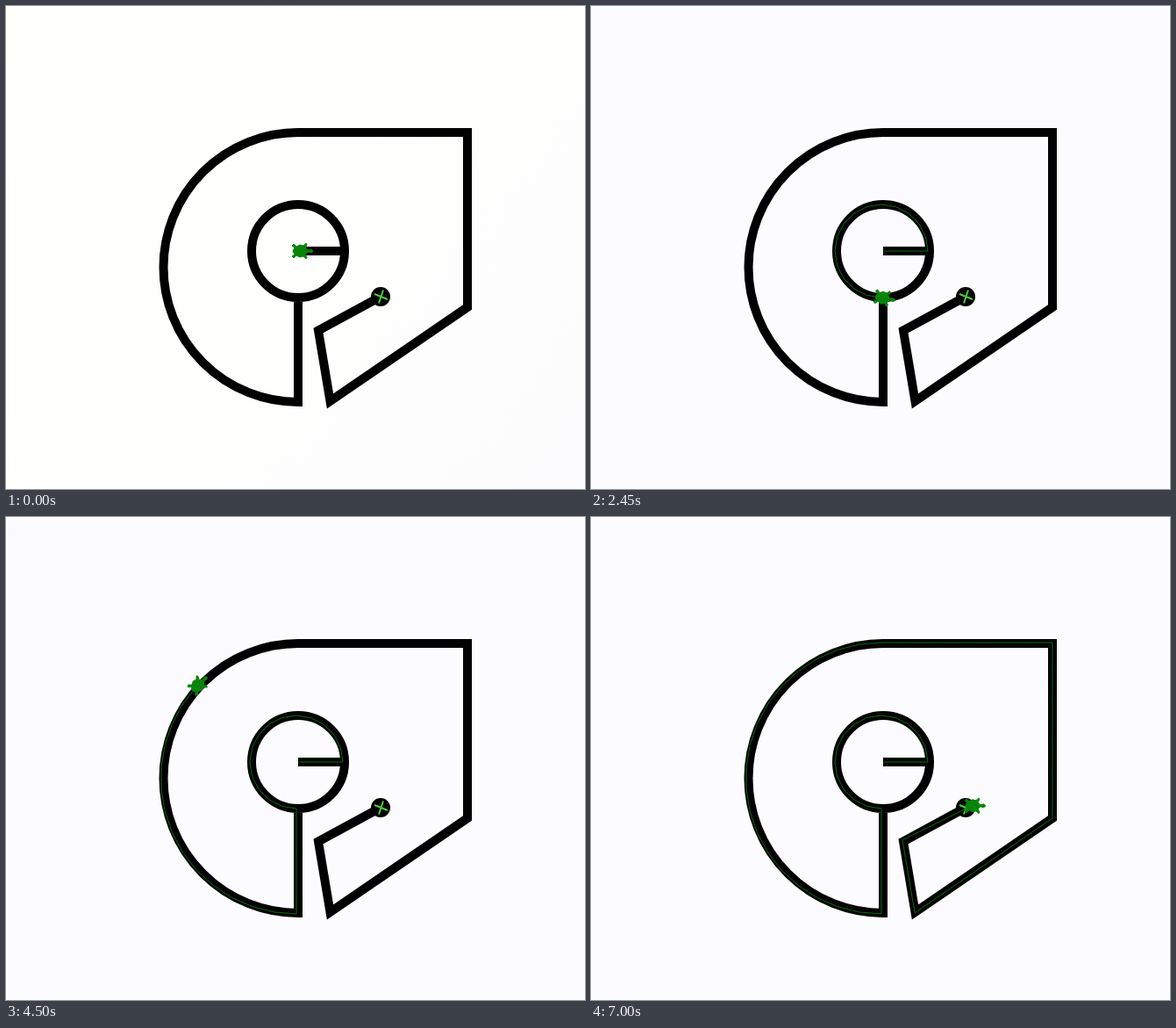
An HTML page with a canvas that plays this animation: 660 px wide and 550 px high, repeating every 8 s.

```html
<!DOCTYPE html>
<html lang="en">
<head>
<meta charset="utf-8">
<title>Turtle path</title>
<style>
html, body { margin: 0; width: 100%; height: 100%; overflow: hidden; background: #fcfcfe; }
canvas { display: block; }
</style>
</head>
<body>
<canvas id="stage" width="660" height="550"></canvas>
<script>
const ctx = document.getElementById('stage').getContext('2d');
const LOOP = 8000, START = 908, TICK = 125 / 3, LAST = 146;
const rad = a => a * Math.PI / 180;

// Every screen update of the turtle is one state.
const STRIDE = 9 * 1.1 ** 3;
const states = [{ x: 334, y: 279, a: 0 }];
const push = change => states.push({ ...states[states.length - 1], ...change });

function forward(d) {
  const { x, y, a } = states[states.length - 1];
  const hops = 1 + Math.floor(d / STRIDE);
  for (let i = 1; i <= hops; i++) {
    const s = d * i / hops;
    push({ x: x + s * Math.cos(rad(a)), y: y - s * Math.sin(rad(a)) });
  }
}

function turn(angle, steps = 1 + Math.floor(Math.abs(angle) / STRIDE)) {
  const { a } = states[states.length - 1];
  for (let i = 1; i <= steps; i++) push({ a: a + angle * i / steps });
}

function circle(radius, extent) {
  const steps = 1 + Math.floor((11 + Math.abs(radius) / 6) * extent / 360);
  const w = extent / steps * Math.sign(radius);
  const chord = 2 * Math.abs(radius * Math.sin(rad(w / 2)));
  turn(w / 2, 1);
  for (let i = 0; i < steps; i++) {
    forward(chord);
    turn(w, 1);
  }
  turn(-w / 2, 1);
}

forward(50);
turn(90);
circle(53, 270);
turn(-90);
forward(120);
turn(-90);
circle(-154.5, 180);
turn(-90 + 90, 0);
forward(195);
turn(-90);
forward(200);
turn(-55.5);
forward(190.4);
turn(-114.9);
forward(84.2);
turn(-73.3);
forward(88);
turn(-26.3);

// Pace: [tick, state index], linear in between.
const pace = [[0, 1], [23, 38], [53, 88], [86, 144], [111, 190], [LAST, states.length - 1]];

function stateAt(t) {
  const k = Math.min(LAST, Math.floor((t - START) / TICK));
  if (k < 0) return 0;
  let i = 1;
  while (k > pace[i][0]) i++;
  const [k0, n0] = pace[i - 1], [k1, n1] = pace[i];
  return Math.floor(n0 + (n1 - n0) * (k - k0) / (k1 - k0) + 1e-6);
}

// Right half of the turtle, nose to tail: sideways, ahead.
const half = [[0, 16], [2, 14], [1, 10], [4, 7], [7, 9], [9, 8], [6, 5],
  [7, 1], [5, -3], [8, -6], [6, -8], [4, -5], [0, -7]];
const shape = half.concat(half.slice(1, -1).reverse().map(([x, y]) => [-x, y]));

function background(t) {
  ctx.fillStyle = '#fcfcfe';
  ctx.fillRect(0, 0, 660, 550);
  const fade = 1 - t / 410;
  if (fade <= 0) return;
  const g = ctx.createLinearGradient(0, 0, 660, 550);
  g.addColorStop(0, '#fffffc');
  g.addColorStop(0.6, '#fefefd');
  g.addColorStop(1, '#fcfcfe');
  ctx.globalAlpha = fade;
  ctx.fillStyle = g;
  ctx.fillRect(0, 0, 660, 550);
  ctx.globalAlpha = 1;
}

function track() {
  ctx.strokeStyle = ctx.fillStyle = '#000';
  ctx.lineWidth = 10;
  ctx.lineJoin = 'miter';
  ctx.beginPath();
  ctx.moveTo(333, 279);
  ctx.lineTo(386, 279);
  ctx.moveTo(386, 279);
  ctx.arc(333, 279, 53, 0, 2 * Math.PI);
  ctx.moveTo(333, 332);
  ctx.lineTo(333, 451);
  ctx.arc(333, 297.5, 153.5, Math.PI / 2, Math.PI * 1.5);
  ctx.lineTo(526, 144);
  ctx.lineTo(526, 343);
  ctx.lineTo(369.5, 450);
  ctx.lineTo(356, 369.5);
  ctx.lineTo(427, 331);
  ctx.stroke();

  ctx.beginPath();
  ctx.arc(427, 331, 11, 0, 2 * Math.PI);
  ctx.fill();
  ctx.strokeStyle = '#4cc83c';
  ctx.lineWidth = 2;
  ctx.beginPath();
  ctx.moveTo(420, 328);
  ctx.lineTo(435, 334);
  ctx.moveTo(430, 323.5);
  ctx.lineTo(425, 338.5);
  ctx.stroke();
}

function trail(n) {
  ctx.strokeStyle = '#087008';
  ctx.lineWidth = 1;
  ctx.beginPath();
  for (let i = 0; i <= n; i++) ctx.lineTo(states[i].x, states[i].y);
  ctx.stroke();
}

function turtle({ x, y, a }) {
  const c = Math.cos(rad(a)), s = Math.sin(rad(a));
  ctx.fillStyle = ctx.strokeStyle = '#088408';
  ctx.lineWidth = 1;
  ctx.beginPath();
  for (const [side, ahead] of shape)
    ctx.lineTo(x + ahead * c + side * s, y - ahead * s + side * c);
  ctx.closePath();
  ctx.fill();
  ctx.stroke();
}

function draw(t) {
  const n = stateAt(t);
  background(t);
  track();
  trail(n);
  turtle(states[n]);
}

function frame() {
  draw(performance.now() % LOOP);
  requestAnimationFrame(frame);
}
frame();
</script>
</body>
</html>
```
